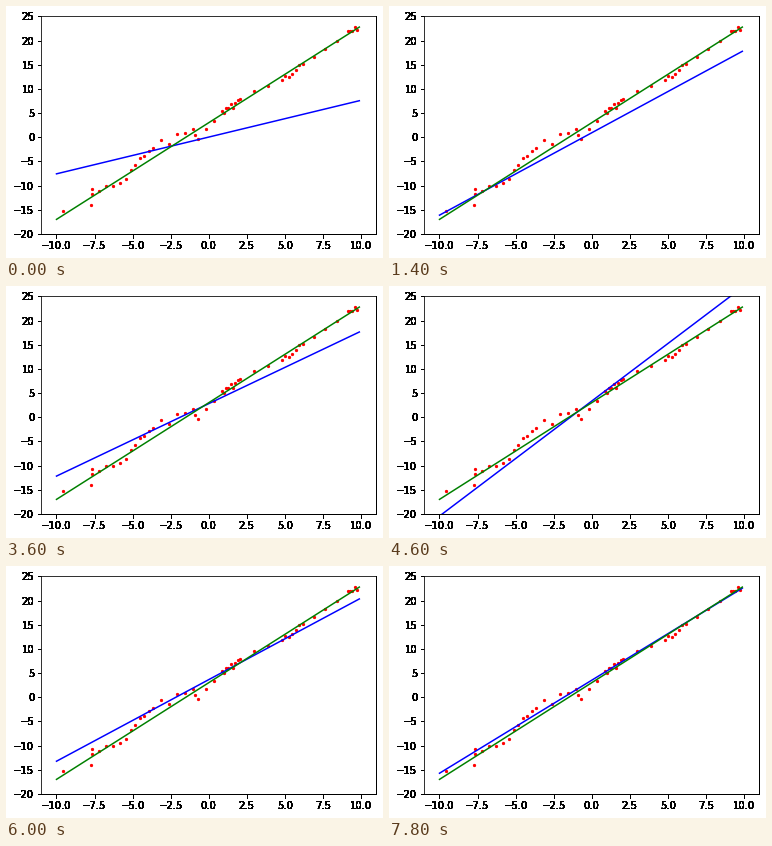
These frames come from a looping animation (377x252 px, 8000 ms). A matplotlib script:

```python
import numpy as np
import matplotlib.pyplot as plt
from matplotlib.animation import FuncAnimation
from matplotlib.artist import Artist

W, H, DPI = 377, 252, 72
FRAMES, INTERVAL = 40, 200
BOX = [35.27 / W, 24.12 / H, 334.8 / W, 217.44 / H]
OVERPRINTS = 18

# Key points of the noisy samples: rank, x, y
KEYS = [(0, -9.6, -15.2), (1, -7.7, -14), (3, -7.65, -10.7), (7, -5.8, -9.5),
        (9, -5.1, -6.7), (14, -3.65, -2.2), (19, -1.05, 1.7), (21, -.7, -.3),
        (24, .85, 5.4), (32, 2.05, 7.9), (35, 4.8, 11.8), (41, 6.2, 15.1),
        (45, 9.15, 22), (49, 9.75, 22.1)]

# Steps at which the fitted slope passes through its final value
CROSSINGS = [-4.35, 1.15, 6.65, 11.83, 16.9, 21.9, 27.0, 31.1, 35.15, 39.4]
DECAY = np.sqrt(0.9)  # momentum 0.9


def slope(step):
    phase = np.pi * np.interp(step, CROSSINGS, np.arange(-1, 9))
    return 2 + 2.03 * DECAY ** step * np.sin(phase)


def intercept(step):
    n = step + 1
    a = np.radians(5.45) * n
    return 3.1 * (1 - DECAY ** n * (np.cos(a) + 0.507 * np.sin(a)))


def samples(count=50):
    rank, kx, ky = np.array(KEYS).T
    i = np.arange(count)
    jitter = np.random.default_rng(4).normal(0, 0.4, count)
    jitter[rank.astype(int)] = 0
    return np.interp(i, rank, kx), np.interp(i, rank, ky) + jitter


class Overprint(Artist):
    """Draws the axis labels and frame many times to harden their edges."""

    def draw(self, renderer):
        for _ in range(OVERPRINTS):
            for part in (ax.xaxis, ax.yaxis, *ax.spines.values()):
                part.draw(renderer)


fig = plt.figure(figsize=(W / DPI, H / DPI), dpi=DPI, facecolor="white")
ax = fig.add_axes(BOX)
ax.set(xlim=(-11, 11), ylim=(-20, 25),
       xticks=np.arange(-10, 11, 2.5), yticks=range(-20, 26, 5))
under = Overprint()
under.set_zorder(-1)
fig.add_artist(under)

x = np.arange(-10, 10, 0.1)
ax.scatter(*samples(), s=5, c="red", linewidths=1)
fit, = ax.plot([], [], color="blue", lw=1.5)
ax.plot(x, 2 * x + 3, color="green", lw=1.5)


def update(step):
    fit.set_data(x, slope(step) * x + intercept(step))
    return fit,


anim = FuncAnimation(fig, update, frames=FRAMES, interval=INTERVAL,
                     init_func=lambda: update(0), repeat=True, repeat_delay=0)
plt.show()
```
